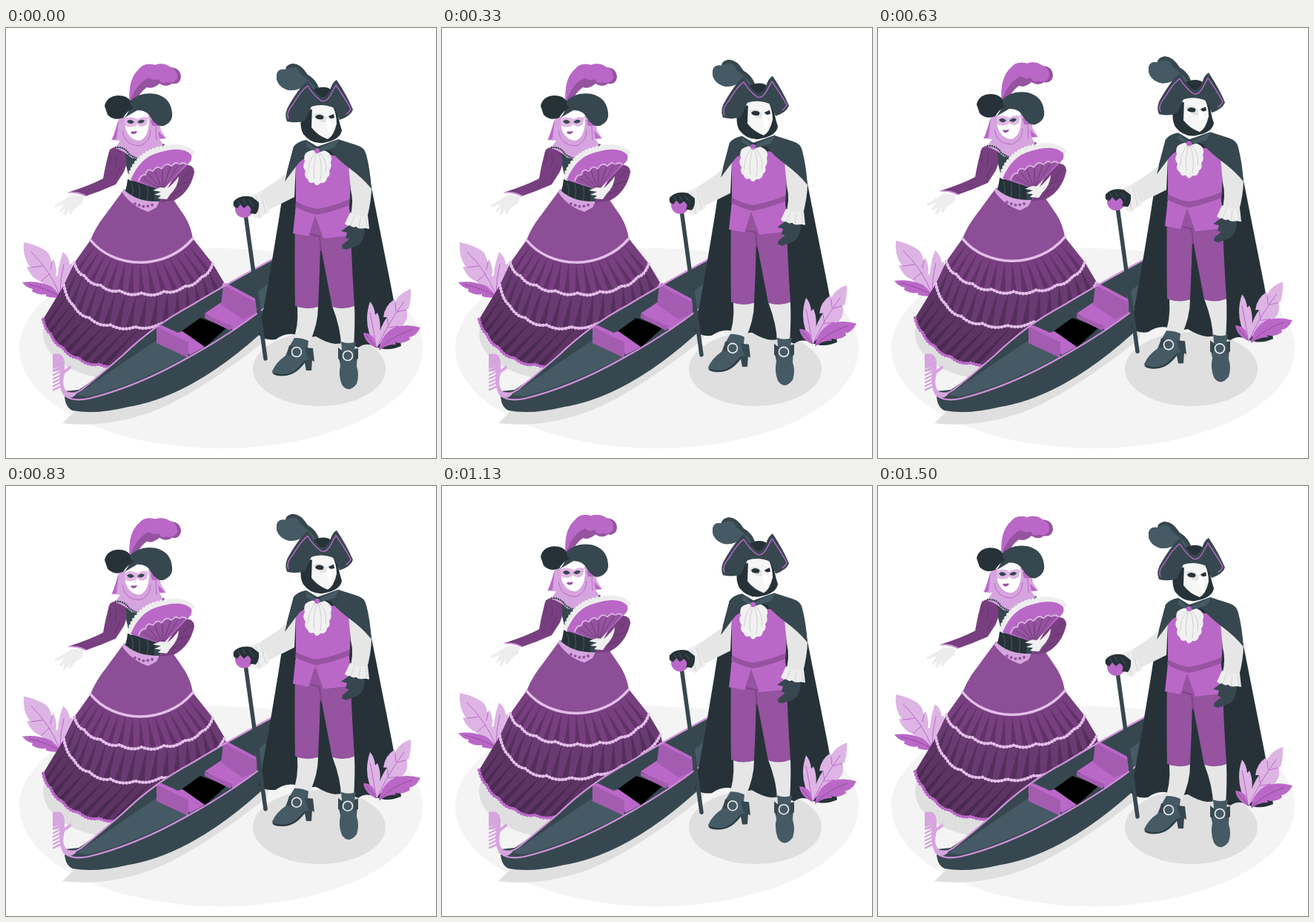
An HTML page that plays this animation: 580 px wide and 580 px high, repeating every 1540 ms.

```html
<!DOCTYPE html>
<html lang="en">
<head>
<meta charset="utf-8">
<title>Masquerade</title>
<style>
html, body { margin: 0; width: 100%; height: 100%; overflow: hidden; background: #fff }
svg { display: block; width: 100%; height: 100% }
.line { fill: none; stroke-linecap: round; stroke-linejoin: round }
</style>
</head>
<body>
<svg viewBox="0 0 580 580">
  <ellipse cx="290" cy="432" rx="272" ry="135" fill="#f4f4f4"/>
  <g fill="#dfdfdf">
    <ellipse cx="422.500" cy="460" rx="89.500" ry="50"/>
    <ellipse cx="160" cy="412" rx="110" ry="63"/>
    <path d="M76 533L100 510L360 375L352 420Q250 500 190 520Q130 540 76 533Z"/>
  </g>

  <g id="lady">
    <path fill="#ddb4e4" d="M72 360Q60 350 50 349Q52 346 47 342Q34 338 28 322L32 322Q22 308 24 289Q40 292 53 300Q60 305 61 315L64 312Q70 325 67 335L71 333Q76 348 72 360ZM72 360Q66 330 77 302Q85 308 86 319L89 317Q92 335 82 347Z"/>
    <path fill="#ba68c8" d="M74 363Q66 352 60 348Q40 340 22 343Q28 351 36 352L35 355Q45 361 54 359L54 362Q64 365 74 363Z"/>
    <path class="line" stroke="#ba68c8" d="M72 359Q61 329 34 302M73 358Q73 338 78 319M47 342L58 332M34 323L49 321M62 316L60 326"/>
    <path class="line" stroke="#8c4e96" d="M73 362Q54 351 31 346"/>

    <path fill="#8c4e96" d="M159 218Q142 241 134 252Q121 268 114 286C145 325 215 328 252 284Q249 264 237 248L222 226Z"/>
    <g id="skirt"></g>

    <path fill="#37474f" d="M157 164L166 202L160 222Q185 241 207 236L216 200L214 162L185 175Z"/>
    <path fill="#263238" d="M164 204Q182 211 201 208L200 236Q180 235 162 220Z"/>
    <path class="line" stroke="#455a64" d="M169 209Q173 218 170 226M179 211Q182 220 179 231M190 211Q193 222 190 234"/>
    <path fill="#d6a4de" d="M158 217Q175 235 207 234L203 242L192 248Q170 241 157 222Z"/>
    <path class="line" stroke="#9553a0" stroke-width="4" stroke-dasharray="0 6" d="M174 237L186 241L194 240L202 237"/>

    <path fill="#783f80" d="M140 164Q149 157 159 165Q166 180 159 194L148 211Q128 220 107 227Q97 222 83 222Q114 212 131 203Q135 180 140 164Z"/>
    <path class="line" stroke="#5d3464" d="M139 168Q143 174 139 184M147 171Q151 177 147 187M154 188L147 203"/>
    <path class="line" stroke="#d6a4de" stroke-width="1.500" d="M85 222Q98 221 107 226"/>
    <path fill="#ededed" d="M88 226Q98 224 105 227L103 236Q92 242 88 251L85 250L86 244L80 253L77 252L80 243L74 249L73 246L79 237L66 242L66 239Z"/>

    <path fill="#d6a4de" d="M154 120L150 128L148 140L142 151L154 152L147 162Q160 166 169 175Q185 180 200 173L214 160L207 150L216 149L209 138L207 127L196 118Z"/>
    <path fill="#ba68c8" d="M152 124L143 151L149 150ZM195 124L207 121L200 128L206 132L197 132ZM205 139L215 149L207 149Z"/>
    <path class="line" stroke="#ba68c8" d="M157 139Q160 159 181 159Q195 153 195 138M202 132L203 151"/>
    <path class="line" stroke="#37474f" stroke-width="2.500" stroke-dasharray="0 3" d="M148 161Q160 160 166 170Q185 184 202 172L213 157"/>
    <path fill="#fff" d="M161 119Q164 109 180 109Q193 111 193 127Q192 148 180 152Q166 151 161 135Z"/>
    <path fill="#e0b8e6" d="M160 122Q168 118 178 123Q184 118 192 121L190 130Q183 136 177 130Q168 137 160 131Z"/>
    <path fill="#37474f" d="M163 126Q168 121 173 127Q167 132 163 126ZM177 127Q182 121 187 125Q184 131 177 127Z"/>
    <path fill="#9553a0" d="M168 141Q170 138 173 140Q175 138 177 140Q173 146 168 141Z"/>
    <path class="line" stroke="#ddd" d="M176 130L173 136"/>

    <path fill="#9553a0" d="M167 101Q164 70 180 55Q187 46 201 50Q212 46 222 53Q236 54 236 67Q234 77 224 75Q216 81 207 75Q198 83 190 80Q181 86 176 98Z"/>
    <path fill="#ba68c8" d="M167 100Q164 68 180 55Q187 46 201 50Q212 46 222 53Q232 56 231 68Q225 77 217 73Q210 77 206 69Q198 72 193 67Q176 74 167 100Z"/>
    <path fill="#37474f" d="M160 121Q172 104 166 100Q180 85 202 89Q222 94 224 114Q226 125 215 131Q205 136 196 122Q190 110 177 111Z"/>
    <path fill="#263238" d="M133 105Q136 92 151 91Q164 91 168 99Q167 106 173 107Q164 111 158 121Q146 126 137 117Z"/>

    <path fill="#783f80" d="M236 185Q254 182 254 195Q248 222 226 233L208 235L219 214Z"/>
    <path class="line" stroke="#5d3464" d="M239 202L248 193M232 212L247 207M225 224L237 219"/>
    <path class="line" stroke="#ededed" stroke-width="8" d="M169 202Q180 172 207 166Q236 157 249 168"/>
    <path class="line" stroke="#ededed" stroke-width="5" stroke-dasharray="0 5" d="M166 199Q177 169 206 162Q239 154 253 169"/>
    <path fill="#ba68c8" d="M168 205Q181 174 206 168Q238 158 250 171Q252 178 246 183L211 219Z"/>
    <path fill="#9553a0" d="M180 207Q186 190 209 188Q231 178 242 184L211 219Z"/>
    <path class="line" stroke="#ddb4e4" stroke-width="1.800" d="M179 206Q182 197 188 198Q190 188 198 193Q204 184 210 190Q216 180 223 186Q230 179 233 184Q240 180 243 184"/>
    <path class="line" stroke="#783f80" d="M186 203L211 219L192 197L211 219L201 193L211 219L211 190L211 219L222 187L211 219L233 184"/>
    <path fill="#f0f0f0" d="M198 219L208 215L218 216Q226 210 233 200Q233 213 221 225L217 231L205 230L209 226L200 225L209 221Z"/>
  </g>

  <g id="gondola">
    <path fill="#37474f" d="M79 490L98 488Q121 474 158 441Q198 402 250 374Q300 344 372 306L372 385Q262 495 165 511Q120 522 90 516Q78 511 79 490Z"/>
    <path fill="#455a64" d="M95 495Q139 464 203 421L245 443Q163 486 110 497ZM336 358L365 336L365 365L336 384Z"/>
    <path d="M237 409L262 391L298 404L268 431Z"/>
    <g fill="#ba68c8">
      <path d="M228 412L238 409L268 430L248 441ZM268 385L292 369L338 379L337 387L308 408Z"/>
    </g>
    <path fill="#a45cb0" d="M203 403L246 423L246 445L203 425ZM293 347L338 368L338 385L319 393L290 373ZM268 386L306 402L302 408L268 391Z"/>
    <path fill="#ba68c8" d="M203 403L210 401L247 418L246 424ZM293 347L297 344L338 366L336 369Z"/>
    <path class="line" stroke="#cf91da" stroke-width="2.200" d="M82 493Q94 496 108 483Q128 467 158 441Q198 402 250 374Q300 344 365 309M80 496Q89 504 111 500Q176 484 243 446Q300 415 348 378"/>
    <path fill="#d6a4de" d="M63 440Q78 436 79 452V461L87 455L88 459L79 466Q74 484 83 491L96 492Q88 504 77 495Q70 482 73 462L63 464V461L73 457L63 460Z"/>
    <path class="line" stroke="#d6a4de" stroke-width="2.500" d="M64 468L74 463M64 473L74 468M64 478L74 473M64 483L74 478M64 488L75 483"/>
  </g>

  <g id="gent">
    <path fill="#263238" d="M388 160L376 205Q361 309 341 414Q350 422 364 420Q378 410 392 414Q405 418 418 416Q433 425 444 426Q460 424 475 431Q486 423 499 430Q515 437 533 429Q530 408 521 357L490 200L470 160Z"/>

    <path fill="#e6e6e6" d="M393 376H421Q421 400 409 425H386Q395 404 393 376ZM440 375H470Q471 400 469 430H452Q452 406 440 375Z"/>
    <path fill="#9553a0" d="M390 245H464Q466 316 470 375Q456 381 440 376L424 292Q423 334 421 376Q405 381 390 375Q389 330 390 245Z"/>
    <path class="line" stroke="#7e4688" stroke-width="2" d="M411 278L423 281L425 300"/>
    <path fill="#ba68c8" d="M391 185Q402 174 417 170L445 172L463 187Q466 208 463 240L464 280L428 284L417 253L408 281L387 277L391 240Z"/>
    <path fill="#9553a0" d="M391 234Q408 243 420 244Q443 240 463 231V239Q440 248 419 252Q403 248 390 241Z"/>

    <path fill="#e6e6e6" d="M391 185Q367 207 337 224L341 252Q369 238 389 228ZM462 185Q482 197 493 215Q493 234 486 260L463 258Q470 238 465 218Z"/>
    <path fill="#ededed" d="M330 226L345 220Q350 238 356 248L347 253L342 258L334 255ZM464 249Q475 255 488 253L490 271L484 270L479 273L472 268L466 270L457 264Z"/>
    <path class="line" stroke="#d2d2d2" d="M337 227L342 255M344 224L350 249M470 253L465 266M478 256L476 270M485 255L487 268"/>
    <path fill="#37474f" d="M388 160Q393 153 405 151L420 160Q402 172 391 187L376 207ZM420 160L448 150L473 158Q484 161 486 171Q491 190 493 217Q481 202 463 189Q446 176 438 166Z"/>

    <path fill="#f1f1f1" d="M419 165Q412 163 404 169Q401 174 403 180Q399 187 404 193Q401 200 407 204Q409 211 415 208Q419 216 424 209Q432 210 433 202Q438 199 436 192Q440 188 438 181Q441 174 436 169Q427 162 419 165Z"/>
    <path class="line" stroke="#cfcfcf" d="M417 168Q407 181 408 195M419 168Q413 189 416 203M421 168Q428 185 424 205M424 169Q434 180 431 195"/>
    <path fill="#455a64" d="M405 153L419 164L450 150L443 161L421 168L405 160Z"/>
    <circle cx="419.500" cy="165.500" r="3.500" fill="#ba68c8"/>

    <path fill="#263238" d="M401 111Q394 130 401 143Q412 157 428 155Q451 151 453 138Q447 120 447 106Z"/>
    <path fill="#f6f6f6" d="M413 106Q425 102 441 106Q446 117 446 129Q442 146 434 150Q420 145 412 134Z"/>
    <path fill="#e2e2e2" d="M414 117Q424 111 432 121L435 119L438 139L433 127L425 127Z"/>
    <path fill="#fff" d="M432 121Q438 122 440 130L438 143Q431 134 432 121Z"/>
    <path fill="#263238" d="M417 120Q420 115 427 118Q430 120 427 123Q419 124 417 120ZM435 119L442 116L443 121Q437 124 435 119Z"/>

    <path fill="#37474f" d="M424 92Q423 72 407 63Q397 47 386 48Q377 50 377 56Q364 54 365 68Q367 80 382 84Q394 85 404 76Q417 81 419 93Z"/>
    <path fill="#455a64" d="M420 91Q419 79 409 72Q404 66 397 62Q395 55 390 53Q381 53 377 56Q364 54 365 68Q367 80 382 84Q394 85 404 77Q412 78 420 91Z"/>
    <path fill="#263238" d="M413 84Q430 75 441 85L436 100H420Z"/>
    <path fill="#37474f" d="M379 126Q374 115 383 102Q398 77 407 71Q414 83 422 91Q430 98 437 84Q440 73 446 70Q460 91 468 110Q465 119 450 124L443 108Q427 101 412 106L403 125Q393 129 379 126Z"/>
    <path class="line" stroke="#ba68c8" stroke-width="1.400" d="M381 122Q377 115 387 103Q399 83 407 78Q415 91 425 98Q432 101 438 90L445 77Q460 99 465 109Q463 114 459 116"/>

    <path class="line" stroke="#37474f" stroke-width="5.500" d="M323 251L350 446"/>
    <circle cx="321" cy="244" r="12" fill="#ba68c8"/>
    <path fill="#263238" d="M307 234Q316 224 332 228L341 235Q342 245 337 251L329 250Q333 243 326 239L321 243L316 238L312 243Q305 242 307 234Z"/>
    <path class="line" stroke="#455a64" d="M313 233L316 238M320 231L323 237M328 232L334 240"/>
    <path fill="#37474f" d="M463 266Q473 272 484 270Q484 286 475 293L459 299L453 297L454 292L463 285L458 283L460 276L452 274Z"/>

    <path fill="#455a64" d="M389 418Q400 418 408 422L407 431L414 436L411 462L405 462L404 450Q394 466 378 469Q359 471 359 463Q364 451 377 442L382 430ZM452 423Q462 427 472 423L470 434L474 440L473 456Q477 468 473 480Q462 494 453 481Q448 468 451 455L448 440L453 434Z"/>
    <path fill="#37474f" d="M382 428L390 431L383 442L379 440ZM403 431L414 432L416 450L407 445ZM448 431L454 436L452 449L448 446ZM470 433L475 432V446L469 449ZM401 449L413 446L412 462H405L403 452Z"/>
    <path class="line" stroke="#263238" stroke-width="1.500" d="M361 466Q379 472 392 461L402 451"/>
    <g class="line" stroke="#f0f0f0" stroke-width="1.600">
      <circle cx="392" cy="437" r="6.500"/><circle cx="461" cy="442" r="6.500"/>
    </g>

    <path fill="#ddb4e4" d="M500 431Q502 406 514 390L509 390Q511 374 524 366L525 369Q531 357 546 352Q547 366 543 379L540 379Q544 393 534 402L529 401Q525 414 516 418Q507 421 500 431ZM499 431Q480 401 491 369Q497 376 498 387L501 384Q509 402 500 431Z"/>
    <path fill="#ba68c8" d="M503 435Q506 412 526 403Q543 399 559 404Q553 416 544 417L545 420Q535 427 525 424L526 427Q514 426 503 435ZM500 432Q484 425 482 411Q491 411 496 418Z"/>
    <path class="line" stroke="#ba68c8" d="M501 430Q513 402 537 369M499 428Q495 403 491 384M514 391L516 404M525 371L526 382M540 380L528 383M530 402L517 404"/>
    <path class="line" stroke="#8c4e96" d="M504 433Q521 415 547 407M500 431L486 415"/>
  </g>
</svg>
<script>
const LOOP = 1540, FPS = 24, PERIOD = 1.5, RISE = 11.6;
const lady = document.getElementById('lady');
const gent = document.getElementById('gent');

// Cubic edges of the skirt tiers, from waist to floor
const edges = [
  [114, 286, 145, 325, 215, 328, 252, 284],
  [92, 317, 115, 368, 250, 373, 279, 318],
  [78, 347, 95, 427, 245, 417, 295, 345],
  [50, 393, 68, 442, 150, 512, 300, 372]
];

function pointOn(c, t) {
  const u = 1 - t;
  return [0, 1].map(i =>
    u ** 3 * c[i] + 3 * u * u * t * c[i + 2] + 3 * u * t * t * c[i + 4] + t ** 3 * c[i + 6]);
}

const curve = c => `${c[0]} ${c[1]}C${c.slice(2).join(' ')}`;

// The edge as a row of hanging swags
function swags(c, count, sag) {
  let d = `${c[0]} ${c[1]}`;
  for (let i = 1; i <= count; i++) {
    const [x, y] = pointOn(c, (i - .5) / count);
    d += `Q${x} ${y + sag} ${pointOn(c, i / count)}`;
  }
  return d;
}

function tier(top, hem, fill, trim, pleats) {
  const [x, y] = pointOn(top, 1);
  const back = [x, y, top[4], top[5], top[2], top[3], top[0], top[1]];
  const edge = swags(hem, 8, 7);
  let folds = '';
  for (let i = 1; i < pleats; i++) {
    const t = i / pleats;
    folds += `M${pointOn(top, t)}L${pointOn(hem, t - .016)}L${pointOn(hem, t + .016)}Z`;
  }
  return `<path fill="${fill}" d="M${edge}L${curve(back)}Z"/>
    <path fill="#000" opacity=".2" d="${folds}"/>
    <path class="line" stroke="${trim}" stroke-width="2.5" d="M${edge}"/>
    <path class="line" stroke="${trim}" stroke-width="4.5" stroke-dasharray="0 4.5" d="M${edge}"/>`;
}

document.getElementById('skirt').innerHTML =
  tier(edges[2], edges[3], '#5d3464', '#ba68c8', 17) +
  tier(edges[1], edges[2], '#6a3b72', '#e3bee9', 17) +
  tier(edges[0], edges[1], '#783f80', '#e3bee9', 16) +
  `<path class="line" stroke="#e3bee9" stroke-width="3.5" d="M${curve(edges[0])}"/>`;

// Linear rise and fall, at rest before its start
function float(el, t) {
  const lift = t > 0 ? RISE * (1 - Math.abs(1 - 2 * (t % PERIOD) / PERIOD)) : 0;
  el.setAttribute('transform', `translate(0 ${-lift})`);
}

function draw() {
  const ms = performance.now() % LOOP;
  const t = Math.floor((ms + 4.9) * FPS / 1000) / FPS;
  float(gent, t);
  float(lady, t - .5);
  requestAnimationFrame(draw);
}
draw();
</script>
</body>
</html>
```
